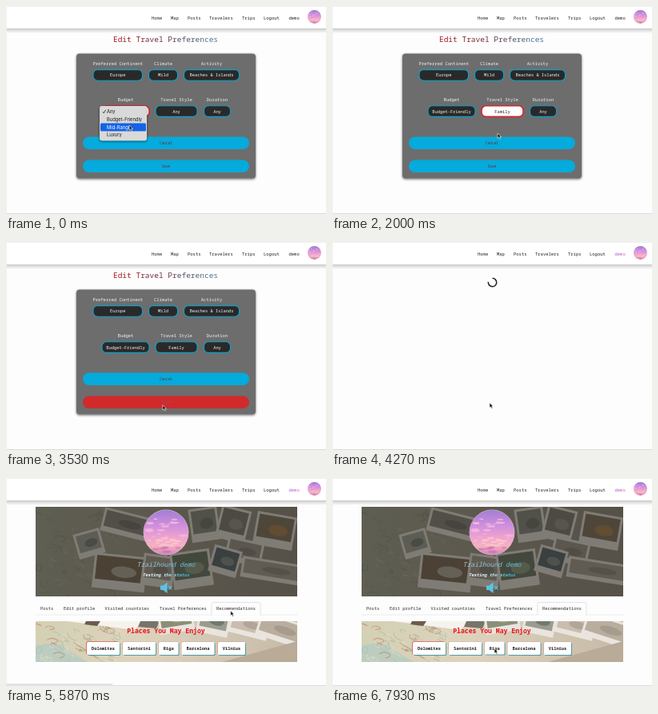
Recreate the animation shown at these times as an HTML page. Size 400 by 260 pixels, loop 8000 ms.

```html
<!DOCTYPE html>
<html lang="en">
<head>
<meta charset="utf-8">
<title>Travel preferences</title>
<style>
  html, body { margin: 0; width: 100%; height: 100%; overflow: hidden; background: #fdfdfd; }
  svg { display: block; width: 100%; height: 100%; }
  text { font-family: "Noto Sans Mono", "DejaVu Sans Mono", monospace; white-space: pre; }
  .menu text { font-family: Inter, "Open Sans", sans-serif; }
</style>
</head>
<body>
<svg viewBox="0 0 400 260">
  <defs>
    <linearGradient id="heading"><stop stop-color="#a80f1c"/><stop offset=".5" stop-color="#673346"/><stop offset="1" stop-color="#44809c"/></linearGradient>
    <linearGradient id="active"><stop stop-color="#8d62dc"/><stop offset="1" stop-color="#e45cad"/></linearGradient>
    <linearGradient id="name"><stop stop-color="#a9c4cc"/><stop offset="1" stop-color="#5cbbdc"/></linearGradient>
    <linearGradient id="status"><stop stop-color="#ffffff"/><stop offset=".4" stop-color="#d5edf3"/><stop offset="1" stop-color="#21acd6"/></linearGradient>
    <linearGradient id="sky" x2="0" y2="1">
      <stop stop-color="#a27ed4"/><stop offset=".35" stop-color="#cf8fdc"/><stop offset=".6" stop-color="#eda2cf"/>
      <stop offset=".8" stop-color="#f5b0c0"/><stop offset="1" stop-color="#d583b8"/>
    </linearGradient>
    <linearGradient id="map"><stop stop-color="#a9aa98"/><stop offset=".35" stop-color="#a6a090"/><stop offset="1" stop-color="#988f84"/></linearGradient>
    <linearGradient id="paleMap"><stop stop-color="#d3d0b4"/><stop offset=".4" stop-color="#ddd3bd"/><stop offset="1" stop-color="#c6baa8"/></linearGradient>
    <linearGradient id="navShade" x2="0" y2="1"><stop stop-color="#000" stop-opacity=".2"/><stop offset="1" stop-color="#000" stop-opacity="0"/></linearGradient>
    <clipPath id="bannerClip"><rect x="37" y="36" width="327" height="112"/></clipPath>
    <clipPath id="placesClip"><rect x="37" y="179" width="327" height="51"/></clipPath>
    <filter id="shadow" x="-20%" y="-20%" width="140%" height="140%"><feDropShadow dx="0" dy="1" stdDeviation="1.6" flood-opacity=".6"/></filter>
    <filter id="soft"><feGaussianBlur stdDeviation=".7"/></filter>
  </defs>
  <rect width="400" height="260" fill="#fdfdfd"/>
  <g id="page"></g>
  <g id="nav"></g>
  <path d="M0 259.5H400" stroke="#dadada"/>
  <path d="M.5 0V260" stroke="#f0f0f0"/>
  <rect id="linkHint" y="257" width="133" height="3" fill="#e2e2e2"/>
  <path id="cursor" d="M0 0V6.2L1.5 4.9L2.6 7.2L3.7 6.7L2.7 4.5H4.5Z" fill="#111" stroke="#fff" stroke-width=".6"/>
</svg>
<script>
const LOOP = 8000;
const $ = id => document.getElementById(id);

const label = (x, y, str, size, fill, extra = '') =>
  `<text x="${x}" y="${y}" font-size="${size}" fill="${fill}" ${extra}>${str}</text>`;
const centered = (x, y, str, size, fill, extra = '') =>
  label(x, y, str, size, fill, 'text-anchor="middle" ' + extra);
const box = (x, y, w, h, r, fill, extra = '') =>
  `<rect x="${x}" y="${y}" width="${w}" height="${h}" rx="${r}" fill="${fill}" ${extra}/>`;

function seeded(seed) {
  return () => (seed = (seed * 16807) % 2147483647) / 2147483647;
}

// Round sky picture with scattered cloudlets, warmer towards the bottom
function avatar(cx, cy, r) {
  const random = seeded(77);
  const clouds = Array.from({ length: 46 }, () => {
    const y = random() * 1.5 - .6, reach = Math.sqrt(1 - y * y) * .8;
    const x = (random() * 2 - 1) * reach, w = .06 + random() * .14;
    const color = y > .6 ? '#c779b4' : y > .2 ? '#fcc8cd' : '#f3b9e2';
    return `<ellipse cx="${cx + x * r}" cy="${cy + y * r}" rx="${w * r}" ry="${w * r * .3}" fill="${color}" opacity=".75"/>`;
  });
  return `<circle cx="${cx}" cy="${cy}" r="${r}" fill="url(#sky)"/>` + clouds.join('');
}

const print = ([x, y, w, h, turn, color, accent]) =>
  `<g transform="translate(${x} ${y}) rotate(${turn})">` +
  box(-w / 2, -h / 2, w, h, 0, '#e9e5de') +
  box(-w / 2 + 3, -h / 2 + 3, w - 6, h * .68, 0, color) +
  `<ellipse cx="${w * .08}" cy="${-h * .02}" rx="${w * .24}" ry="${h * .16}" fill="${accent}"/></g>`;

// Fine wandering lines and patches of a paper map
function terrain(x, y, w, h, colors) {
  const random = seeded(31);
  return Array.from({ length: 60 }, (_, i) => {
    const px = x + random() * w, py = y + random() * h, dx = random() * 16 - 8, dy = random() * 12 - 6;
    return `<path d="M${px} ${py}q${dx} ${dy} ${dx + 6} ${dy + 3}t${dy} ${dx}" fill="none" stroke="${colors[i % colors.length]}" stroke-width="1.1" opacity=".55"/>`;
  }).join('');
}

const banner = `<g clip-path="url(#bannerClip)"><g filter="url(#soft)">` +
  box(37, 36, 327, 112, 0, 'url(#map)') + terrain(37, 36, 100, 112, ['#7f8a78', '#c2bda9', '#8e9a80']) +
  [[150, 58, 60, 30, 14, '#8f8b84', '#77746e'], [104, 82, 34, 32, -16, '#a5a89f', '#7c857b'],
   [248, 58, 36, 42, -8, '#8d9088', '#747a70'], [284, 58, 38, 42, 14, '#858279', '#9d968b'],
   [336, 66, 50, 42, 10, '#8a7866', '#b08656'], [298, 92, 46, 30, 12, '#a19c92', '#8d887f'],
   [142, 118, 66, 44, 6, '#846f5c', '#b5aea0'], [190, 116, 40, 40, 8, '#aaa49a', '#8e8a80'],
   [232, 114, 50, 46, -8, '#717d6c', '#98a18a'], [274, 104, 36, 34, 16, '#5f6c70', '#89918c'],
   [332, 116, 76, 26, 9, '#aca59a', '#969087']].map(print).join('') +
  `</g>${box(37, 36, 327, 112, 0, '#16140f', 'opacity=".5"')}</g>`;

const placesPhoto = `<g clip-path="url(#placesClip)"><g filter="url(#soft)">` +
  box(37, 179, 327, 51, 0, 'url(#paleMap)') +
  '<path d="M37 210q22-8 36 2t30 18H37Z" fill="#bccdc0"/>' +
  terrain(37, 180, 105, 48, ['#c4765f', '#a3b48c', '#eadfc4', '#9dbdb8']) +
  '<path d="M76 179L160 190L172 179Z" fill="#f6f3ee"/>' +
  '<path d="M100 179H118L114 185L98 183Z" fill="#6d5b4d"/>' +
  '<path d="M168 179H192L188 188L165 186Z" fill="#77756a"/>' +
  [[212, 176, 44, 34, -9, '#8b8f78', '#b5a58c'], [260, 179, 40, 34, 12, '#9a9c90', '#71796f'],
   [304, 184, 50, 28, 14, '#c9beae', '#b1a698'], [344, 190, 60, 30, 18, '#b9ae9e', '#a69b8c']].map(print).join('') +
  '<path d="M270 230L364 204V230Z" fill="#b9ab97"/></g></g>';

function nav(onProfile) {
  const links = [[182, 'Home'], [206, 'Map'], [227, 'Posts'], [254, 'Travelers'], [295, 'Trips'], [322, 'Logout'], [353.5, 'demo']];
  return box(0, 0, 400, 28, 0, '#fff') + box(0, 28, 400, 6, 0, 'url(#navShade)') +
    '<path d="M0 .5H400" stroke="#f0f0f0"/>' +
    links.map(([x, str]) => label(x, 17.3, str, 5.5, onProfile && str === 'demo' ? 'url(#active)' : '#222')).join('') +
    avatar(385.5, 13.5, 8.5);
}

function field(x, y, w, title, value, focused) {
  const frame = focused ? 'stroke="#d9232e" stroke-width="1.6"' : 'stroke="#08a5d2" stroke-width="1.1"';
  return centered(x + w / 2, y - 5.6, title, 5.5, '#f2f2f2') +
    box(x, y, w, 13.6, 5.5, focused ? '#fff' : '#292929', frame) +
    centered(x + w / 2, y + 8.8, value, 5.4, focused ? '#222' : '#f4f4f4');
}

function menu(x, w, items, pointerY) {
  const top = 125, row = 9.8;
  const hovered = Math.floor((pointerY - top - 2) / row);
  return `<g class="menu">` + box(x, top, w, items.length * row + 4, 3, '#d9d9d9', 'filter="url(#shadow)"') +
    items.map((item, i) => {
      const y = top + 2 + i * row, color = i === hovered ? '#fff' : '#1c1c1c';
      return (i === hovered ? box(x + 1, y, w - 2, row, 1.5, '#1463e6') : '') +
        label(x + 9, y + 7, item, 5.8, color) +
        (i ? '' : `<path d="M${x + 4} ${y + 5.2}l1.3 1.7l2.3-4" fill="none" stroke="${color}" stroke-width=".8"/>`);
    }).join('') + '</g>';
}

function form(t, pointerY) {
  const saveHover = t >= 2400;
  const focus = t < 1250 ? 'budget' : t < 3000 ? 'style' : '';
  return centered(199.5, 45, 'Edit Travel Preferences', 9.5, 'url(#heading)') +
    box(88, 59.5, 224, 156, 4, '#6d6d6d', 'filter="url(#shadow)"') +
    field(109, 79.6, 61.5, 'Preferred Continent', 'Europe') +
    field(178.5, 79.6, 36, 'Climate', 'Mild') +
    field(222.5, 79.6, 69, 'Activity', 'Beaches &amp; Islands') +
    field(120, 124.8, 59, 'Budget', t < 450 ? 'Any' : 'Budget-Friendly', focus === 'budget') +
    field(187, 124.8, 52, 'Travel Style', t < 2000 ? 'Any' : 'Family', focus === 'style') +
    field(247.5, 124.8, 33, 'Duration', 'Any') +
    box(96, 163.5, 208, 15.5, 7.7, '#04abdc') + centered(200, 172.9, 'Cancel', 4.4, '#7b2438') +
    box(96, 192.4, 208, 15.5, 7.7, saveHover ? '#d12a2b' : '#04abdc') +
    centered(200, 201.8, 'Save', 4.4, saveHover ? '#8b5366' : '#7b2438') +
    (t < 450 ? menu(117, 59, ['Any', 'Budget-Friendly', 'Mid-Range', 'Luxury'], pointerY) : '') +
    (t >= 1250 && t < 2000 ? menu(184, 52, ['Any', 'Solo', 'Couple', 'Family', 'Group'], pointerY) : '');
}

const spinner = t =>
  `<circle cx="200.5" cy="50.5" r="5.2" fill="none" stroke="#222" stroke-width="1.5" stroke-dasharray="24.5 8.2"
    transform="rotate(${(t - 4270) * .48 - 90} 200.5 50.5)"/>`;

function tabs(active, hovered) {
  const items = [[37, 29, 'Posts'], [66, 51, 'Edit profile'], [117.5, 68, 'Visited countries'],
    [186, 71, 'Travel Preferences'], [257, 61, 'Recommendations']];
  return '<path d="M37 171H364" stroke="#dee2e6" stroke-width=".7"/>' + items.map(([x, w, str]) => {
    const on = str === active, over = str === hovered && !on;
    const edge = `<path d="M${x} 171.4V157.5q0-2 2-2H${x + w - 2}q2 0 2 2V171.4" fill="#fdfdfd" stroke="${on ? '#d3d8dc' : '#e6e9ec'}" stroke-width=".7"/>`;
    return (on || over ? edge : '') + label(x + 6, 165.2, str, 5.45, over ? '#e8262a' : '#2b2b2b');
  }).join('');
}

function card([x, w, str], i, pointer) {
  const over = pointer.y > 204 && pointer.x > x && pointer.x < x + w;
  return `<g transform="translate(0 ${over ? -.5 : 0})">` +
    box(x + 1, 206, w, 16, 1.5, '#17889f', 'opacity=".7"') +
    box(x - .6, 204.4, w, 16, 1.5, '#e32a2a', `opacity="${i ? .25 : 1}"`) +
    box(x, 205, w, 16, 1.5, '#fff') +
    centered(x + w / 2, 215, str, 5.4, '#1d1d1d', 'font-weight="bold"') + '</g>';
}

const places = pointer => placesPhoto +
  centered(200, 194, 'Places You May Enjoy', 8.15, '#e9131d', 'font-weight="bold"') +
  [[101, 41, 'Dolomites'], [146, 41, 'Santorini'], [191, 24.5, 'Riga'], [219.5, 41, 'Barcelona'], [265, 34, 'Vilnius']]
    .map((item, i) => card(item, i, pointer)).join('');

function profile(t, pointer) {
  const opened = t >= 5600;
  const overTab = t >= 5250 && pointer.x > 257 && pointer.y > 155 && pointer.y < 171;
  return banner + '<circle cx="200" cy="68" r="28.4" fill="#d9c3d8"/>' + avatar(200, 68, 28) +
    centered(200, 111, 'Trailhound demo', 8.1, 'url(#name)', 'font-style="italic"') +
    centered(200, 123, 'Testing the status', 5.45, 'url(#status)', 'font-style="italic" font-weight="bold"') +
    '<path d="M193 134.6H196.2L201.6 130.6V144L196.2 140H193Z" fill="#5cc3e4"/>' +
    '<path d="M203.2 135.2l4.2 4.2M207.4 135.2l-4.2 4.2" stroke="#5cc3e4" stroke-width="1.1"/>' +
    tabs(opened ? 'Recommendations' : 'Posts', overTab ? 'Recommendations' : '') +
    (opened ? places(pointer) : '');
}

// Pointer stops: time, x, y
const stops = [[0, 154, 149], [70, 154, 149], [300, 150, 140], [500, 150, 140], [900, 211, 132], [1300, 211, 132],
  [1800, 207, 159], [2050, 207, 159], [2550, 195, 206], [3300, 195, 206], [3800, 197, 201], [4400, 197, 201],
  [5200, 289, 163], [5750, 289, 163], [6500, 170, 205], [7000, 170, 205], [7750, 203, 213], [LOOP, 203, 213]];

function pointerAt(t) {
  const i = stops.findIndex(s => s[0] > t);
  const [t0, x0, y0] = stops[i - 1], [t1, x1, y1] = stops[i];
  const u = (t - t0) / (t1 - t0), k = u * u * (3 - 2 * u);
  return { x: x0 + (x1 - x0) * k, y: y0 + (y1 - y0) * k };
}

function render(now) {
  const t = now % LOOP, pointer = pointerAt(t);
  $('page').innerHTML = t < 3900 ? form(t, pointer.y) : t < 4330 ? spinner(t) : profile(t, pointer);
  $('nav').innerHTML = nav(t >= 3900);
  $('linkHint').style.display = t >= 5250 && t < 6800 ? '' : 'none';
  $('cursor').setAttribute('transform', `translate(${pointer.x} ${pointer.y})`);
}

const start = performance.now();
function tick() {
  render(performance.now() - start);
  requestAnimationFrame(tick);
}
tick();
</script>
</body>
</html>
```
